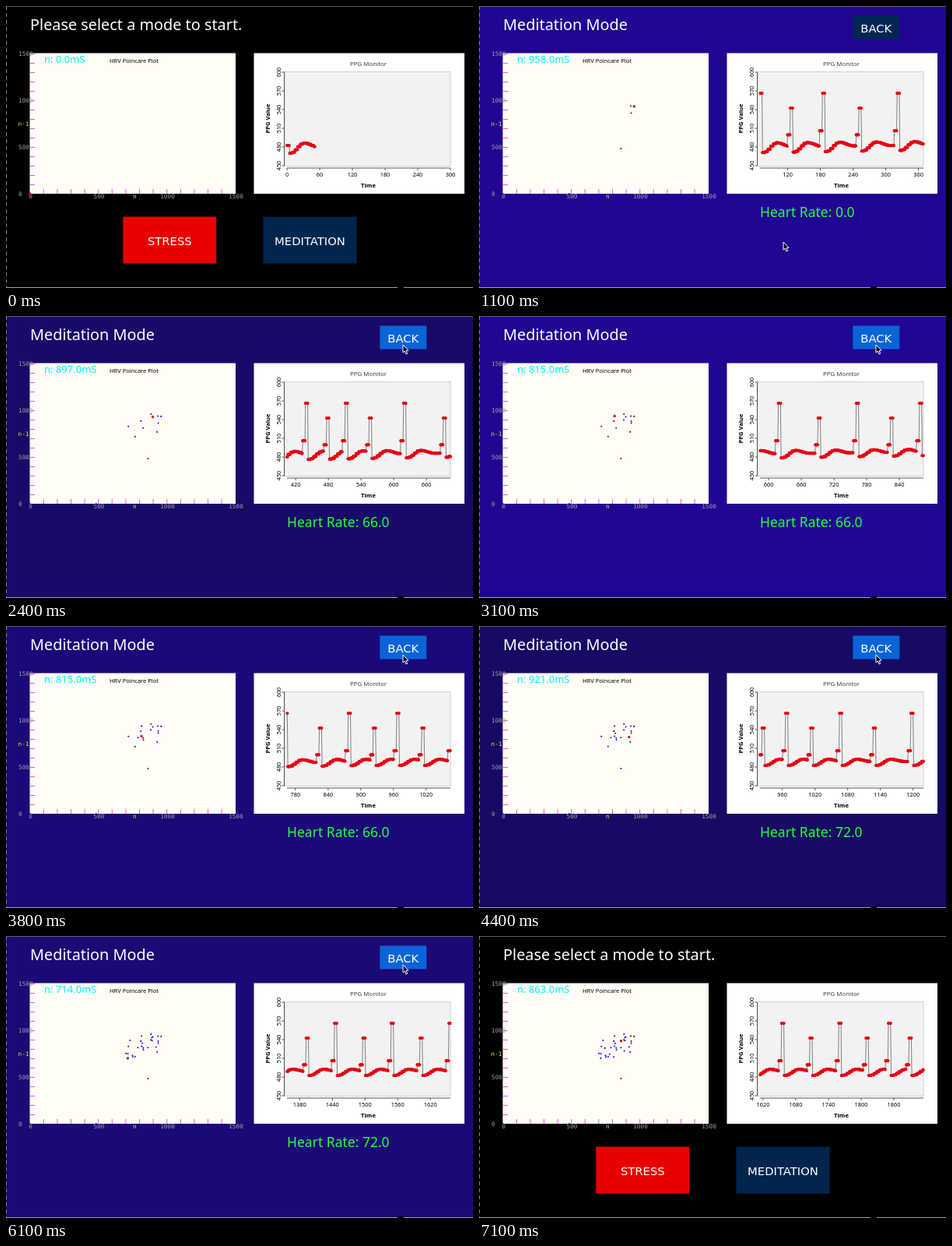
Recreate the animation shown at these times as an HTML page with a canvas. Size 600 px wide and 362 px high, loop 7200 ms.

```html
<!DOCTYPE html>
<html lang="en">
<head>
<meta charset="utf-8">
<title>Heart monitor</title>
<style>
html, body { margin: 0; width: 100%; height: 100%; overflow: hidden; background: #000; }
canvas { display: block; }
</style>
</head>
<body>
<canvas id="stage" width="600" height="362"></canvas>
<script>
const ctx = document.getElementById('stage').getContext('2d');
const LOOP = 7200, STEP = 100;
const MODE_START = 700, MODE_END = 6600;
const WINDOW = 300;
const SANS = '"Noto Sans", sans-serif';
const WIDE = '"DejaVu Sans", sans-serif';
const MONO = '"DejaVu Sans Mono", monospace';

// Slow drift of the heart rhythm: [beat, gap in samples, interval in ms].
const rhythm = [[0, 71, 0], [1, 71, 441], [2, 56, 900], [5, 70, 965], [9, 34, 750], [12, 73, 922],
                [17, 43, 830], [22, 72, 880], [25, 52, 740], [31, 53, 760], [34, 38, 868]];
const cursorPath = [[100, 391, 375], [500, 391, 303], [1300, 391, 303], [1900, 510, 37],
                    [6600, 510, 37], [6900, 510, -20]];
const glowPath = [[700, 0.8], [1100, 1], [2400, 0.1], [3100, 1], [4400, 0], [5200, 0], [6600, 0.5]];

const clamp = v => Math.max(0, Math.min(1, v));
const mix = (a, b, p) => a + (b - a) * p;
const smooth = p => (1 - Math.cos(Math.PI * clamp(p))) / 2;

function along(path, t) {
  const next = path.findIndex(key => key[0] > t);
  if (next === 0) return path[0].slice(1);
  if (next < 0) return path[path.length - 1].slice(1);
  const a = path[next - 1], b = path[next];
  const p = smooth((t - a[0]) / (b[0] - a[0]));
  return a.slice(1).map((v, i) => mix(v, b[i + 1], p));
}

// Strong and weak beats alternate, the interval jitters around its drift.
const beats = [{ at: 2, peak: 179, interval: 0 }];
for (let i = 1, at = 0; i <= 34; i++) {
  const [gap, interval] = along(rhythm, i);
  at += gap;
  beats.push({ at, peak: i % 2 ? 112 : 131, interval: Math.round(interval + 50 * Math.sin(i * i)) });
}

// Pulse wave height; every reading is held for five samples.
function pulse(n) {
  let i = beats.length - 1;
  while (i > 0 && beats[i].at - 7.5 > n) i--;
  const { at, peak } = beats[i];
  const k = Math.floor((n - at + 2.5) / 5);
  if (k < 0) return mix(178, peak, 0.27);
  if (k === 0) return peak;
  const u = k * 5 - 5, settled = clamp(at / 900);
  const crest = mix(176, 171, settled);
  if (u < 25) return mix(mix(189, 179, settled), crest, smooth(u / 25));
  return crest + mix(5, 3, settled) * smooth((u - 25) / 25);
}

function rect(x, y, w, h, color) {
  ctx.fillStyle = color;
  ctx.fillRect(x, y, w, h);
}

function line(x1, y1, x2, y2, color, dash = []) {
  ctx.strokeStyle = color;
  ctx.lineWidth = 1;
  ctx.setLineDash(dash);
  ctx.beginPath();
  ctx.moveTo(x1, y1);
  ctx.lineTo(x2, y2);
  ctx.stroke();
  ctx.setLineDash([]);
}

function dot(x, y, r, color) {
  ctx.fillStyle = color;
  ctx.beginPath();
  ctx.arc(x, y, r, 0, 2 * Math.PI);
  ctx.fill();
}

function text(str, x, y, size, color, { align = 'left', weight = 400, turned = false, font = SANS } = {}) {
  ctx.save();
  ctx.translate(x, y);
  if (turned) ctx.rotate(-Math.PI / 2);
  ctx.font = `${weight} ${size}px ${font}`;
  ctx.textAlign = align;
  ctx.fillStyle = color;
  ctx.fillText(str, 0, 0);
  ctx.restore();
}

function button(label, x, y, w, h, color, [mx, my]) {
  const hover = mx > x && mx < x + w && my > y && my < y + h;
  rect(x, y, w, h, hover ? '#0a64d8' : color);
  text(label, x + w / 2, y + h / 2 + 6.5, 14.8, '#fff', { align: 'center', font: WIDE });
}

function drawPoincare(count) {
  const px = v => 30.7 + v * 0.176, py = v => 241 - v * 0.12;
  const small = { font: MONO };
  rect(30.5, 60.5, 264.5, 180.5, '#fffdf5');
  for (let v = 100; v <= 1500; v += 100) {
    line(31, py(v) + 0.5, 37, py(v) + 0.5, '#f050e8');
    if (v < 1500) line(px(v), 235, px(v), 241, '#f050e8');
  }
  for (let v = 0; v <= 1500; v += 500) {
    text(v, 16, py(v) + 3, 7.7, '#a0a0a0', small);
    text(v, px(v) + 0.8, 247, 7.7, '#a0a0a0', { align: 'center', ...small });
  }
  text('n-1', 15.5, 154, 7.7, '#e6e650', small);
  text('n', 163, 247, 7.7, '#e6e650', small);
  text('HRV Poincare Plot', 133, 73, 7.5, '#000');
  text(`n: ${beats[count].interval.toFixed(1)}mS`, 49, 73, 13, '#00f0ff');
  for (let i = 0; i <= count; i++) {
    const last = i === count;
    const previous = i ? beats[i - 1].interval : 0;
    dot(px(beats[i].interval), py(previous), last ? 1.7 : 1.05, last ? '#e00020' : '#2014c8');
  }
}

function drawMonitor(end) {
  const start = Math.max(0, end - WINDOW);
  const px = n => 361 + (n - start) * 0.7;
  rect(318.5, 60.5, 270.5, 180.5, '#fff');
  rect(358, 85, 213, 120, '#f2f2f2');
  ctx.strokeStyle = '#d0d0d0';
  ctx.lineWidth = 1;
  ctx.strokeRect(358, 84.5, 213, 121);
  text('PPG Monitor', 465.5, 77, 7.9, '#404040', { align: 'center' });
  text('Time', 465.5, 233, 7.7, '#000', { align: 'center', weight: 600 });
  text('PPG Value', 339, 144.5, 7.6, '#000', { align: 'center', weight: 600, turned: true });

  line(357.5, 85, 357.5, 205, '#555');
  line(361, 208, 571, 208, '#555');
  for (let v = 450; v <= 600; v += 30) {
    const y = 205 - (v - 450) * 0.8;
    line(354.5, y, 358, y, '#555');
    text(v, 352.5, y, 7.4, '#000', { align: 'center', turned: true });
  }
  for (let n = Math.ceil(start / 60) * 60; n <= start + WINDOW; n += 60) {
    line(px(n), 208, px(n), 211, '#555');
    text(n, px(n), 218.5, 7.4, '#000', { align: 'center' });
  }

  const points = [];
  for (let n = Math.ceil(start); n <= end; n++) points.push([px(n), pulse(n)]);
  ctx.strokeStyle = '#808080';
  ctx.beginPath();
  points.forEach(p => ctx.lineTo(...p));
  ctx.stroke();
  points.forEach(([x, y]) => dot(x, y, 2.1, '#e80014'));
}

function drawCursor([x, y]) {
  ctx.beginPath();
  [[0, 0], [0, 10], [2.3, 8], [4, 12], [5.7, 11.2], [4, 7.4], [7, 7.2]]
    .forEach(([dx, dy]) => ctx.lineTo(x + dx, y + dy));
  ctx.closePath();
  ctx.fillStyle = '#000';
  ctx.strokeStyle = '#fff';
  ctx.lineWidth = 1;
  ctx.fill();
  ctx.stroke();
}

function drawWindowEdge() {
  line(0, 0.5, 600, 0.5, '#606060');
  line(0.5, 0, 0.5, 362, '#808080', [5, 4]);
  line(0, 361.5, 600, 361.5, '#a0a0a0');
  rect(503, 360, 8, 2, '#000');
}

function draw(t) {
  const end = t ? 86 + t * 0.2575 : 51;
  const count = beats.filter(b => b.at <= end).length - 1;
  const meditating = t >= MODE_START && t < MODE_END;
  const mouse = along(cursorPath, t);
  const [glow] = along(glowPath, t);

  rect(0, 0, 600, 362, meditating
    ? `rgb(${mix(23, 33, glow)}, ${mix(10, 6, glow)}, ${mix(100, 147, glow)})` : '#000');
  drawWindowEdge();
  text(meditating ? 'Meditation Mode' : 'Please select a mode to start.', 31, 31, 19.85, '#fff');
  drawPoincare(count);
  drawMonitor(end);
  if (meditating) {
    const rate = count < 10 ? 0 : 60 + 6 * Math.floor(count / 10);
    button('BACK', 480.3, 12.5, 60, 30, '#002654', mouse);
    text(`Heart Rate: ${rate.toFixed(1)}`, 361, 271, 17.5, '#28ff3c');
  } else {
    button('STRESS', 150.3, 270.5, 120, 60, '#e80000', mouse);
    button('MEDITATION', 330.5, 270.5, 120, 60, '#00264e', mouse);
  }
  drawCursor(mouse);
}

function tick() {
  draw(Math.floor(performance.now() % LOOP / STEP) * STEP);
  requestAnimationFrame(tick);
}
tick();
</script>
</body>
</html>
```
